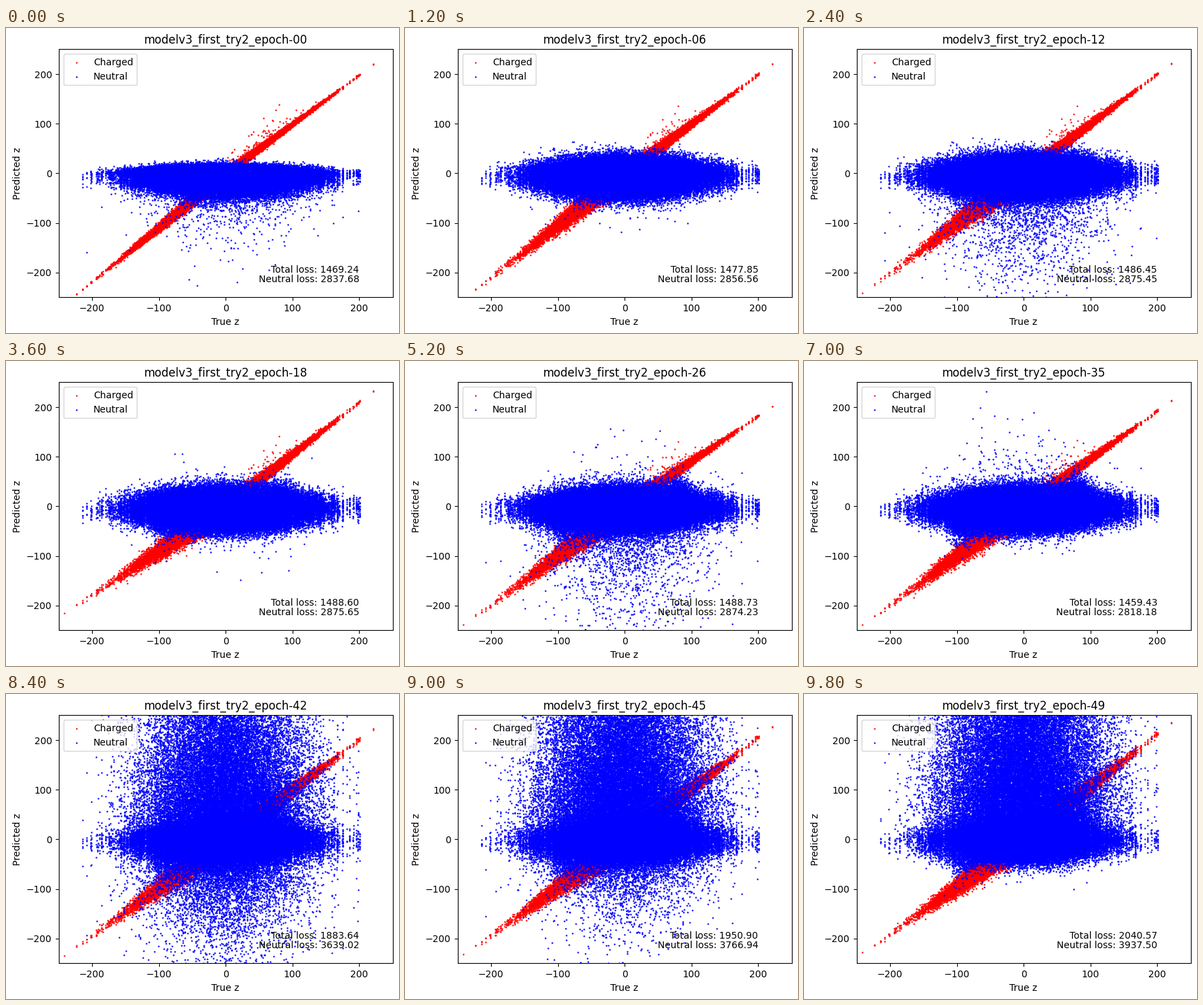
A matplotlib script for the animation above (10000 ms loop, 580 by 450 pixels).

```python
import numpy as np
import matplotlib.pyplot as plt
from matplotlib.animation import FuncAnimation

W, H, DPI = 580, 450, 100
EPOCHS, STEP_MS = 50, 200

# Logged checkpoints: losses, and the slope of the charged band on each side
KEYS = [0, 12, 18, 26, 35, 42, 49]
TOTAL = [1469.24, 1486.45, 1488.60, 1488.73, 1459.43, 1883.64, 2040.57]
NEUTRAL = [2837.68, 2875.45, 2875.65, 2874.23, 2818.18, 3639.02, 3937.50]
SLOPE_LEFT = [1.09, 1.0, 0.89, 0.99, 0.99, 0.97, 0.95]
SLOPE_RIGHT = [0.99, 1.0, 1.05, 0.91, 0.96, 1.0, 1.06]

# Particles share the true z of their vertex, which gives vertical streaks
rng = np.random.default_rng(7)
vertices = rng.normal(0, 62, 9000)
vertices = vertices[np.abs(vertices) < 215]
shift = rng.normal(0, 3, len(vertices))

pick = rng.integers(0, len(vertices), 90000)
blue_x, blue_shift = vertices[pick], shift[pick]
blue_noise = rng.normal(size=len(pick))
blue_rank = rng.random(len(pick))
blue_far = rng.exponential(size=len(pick))

red_x = np.append(np.repeat(vertices, 3), [-241, -223, -223, 221, 221])
red_noise = rng.normal(size=len(red_x))
red_far = rng.exponential(14, len(red_x)) * (rng.random(len(red_x)) < 0.015)
red_far *= np.exp(-((red_x - 60) / 60) ** 2)


def phases(epoch):
    grow = 1 - np.exp(-epoch / 4)                      # early widening
    wave = np.cos(2 * np.pi * (epoch - 12) / 14.7)     # low tail comes and goes
    burst = np.sqrt(np.clip((epoch - 35) / 14, 0, 1))  # late upward plume
    return grow, wave, burst


def mix(base, gen):
    """Noise that stays partly the same from one epoch to the next."""
    return 0.85 * base + 0.53 * gen.normal(size=len(base))


def hill(mid):
    return np.exp(-((blue_x - mid) / 18) ** 2)


def charged(epoch, gen):
    grow, _, burst = phases(epoch)
    left = red_x < 0
    slope = np.where(left, np.interp(epoch, KEYS, SLOPE_LEFT),
                     np.interp(epoch, KEYS, SLOPE_RIGHT))
    width = np.where(left, 5.5 + 5.5 * grow, 3 + 2 * grow + 4 * burst)
    width = width * np.clip(1.25 - np.abs(red_x) / 220, 0.2, None)
    return slope * red_x + width * mix(red_noise, gen) + red_far


def neutral(epoch, gen):
    grow, wave, burst = phases(epoch)
    age = epoch / EPOCHS

    # Core: a lopsided bell, narrower towards large |z|
    up = (8 + 10.5 * grow) * (1 + 0.8 * age * hill(83))
    down = (19 + grow) * (1 + 0.8 * age * hill(-95))
    n = mix(blue_noise, gen)
    y = np.where(n > 0, up, down) * n * (1 - 0.42 * (blue_x / 200) ** 2)
    y += blue_shift * (0.4 + 0.6 * grow)

    # Exponential tails below and above the core
    far = blue_far * np.exp(0.2 * gen.normal(size=len(y)))
    p_low = 0.001 + (1 + wave) * (0.02 + 0.055 * burst)
    low = (42 + 20 * wave) * (0.6 + 0.4 * grow)
    p_high = 0.018 * age ** 2 + 0.54 * burst
    high = 12 + 40 * age + 195 * burst
    y = np.where(blue_rank < p_low, -low * far, y)
    y = np.where(blue_rank > 1 - p_high, high * far, y)
    return y - 2 - 2 * grow


fig = plt.figure(figsize=(W / DPI, H / DPI), dpi=DPI)
ax = fig.add_axes([77.6 / W, 1 - 397.4 / H, 493 / W, 366 / H])
ax.set(xlim=(-250, 250), ylim=(-250, 250), xlabel="True z", ylabel="Predicted z")
ax.set_xticks(range(-200, 201, 100))
ax.set_yticks(range(-200, 201, 100))

red = ax.scatter([], [], s=3, linewidths=0, c="red", label="Charged")
blue = ax.scatter([], [], s=3, linewidths=0, c="blue", label="Neutral")
ax.legend(loc="upper left")
title = ax.set_title("")
total_text = ax.text(200, -200, "", ha="right")
neutral_text = ax.text(200, -220, "", ha="right")


def draw(epoch):
    gen = np.random.default_rng(100 + epoch)
    red.set_offsets(np.column_stack([red_x, charged(epoch, gen)]))
    blue.set_offsets(np.column_stack([blue_x, neutral(epoch, gen)]))
    title.set_text(f"modelv3_first_try2_epoch-{epoch:02d}")
    total_text.set_text(f"Total loss: {np.interp(epoch, KEYS, TOTAL):.2f}")
    neutral_text.set_text(f"Neutral loss: {np.interp(epoch, KEYS, NEUTRAL):.2f}")
    return red, blue, title, total_text, neutral_text


anim = FuncAnimation(fig, draw, frames=EPOCHS, init_func=lambda: draw(0),
                     interval=STEP_MS, repeat=True, repeat_delay=0, blit=False)
plt.show()
```
